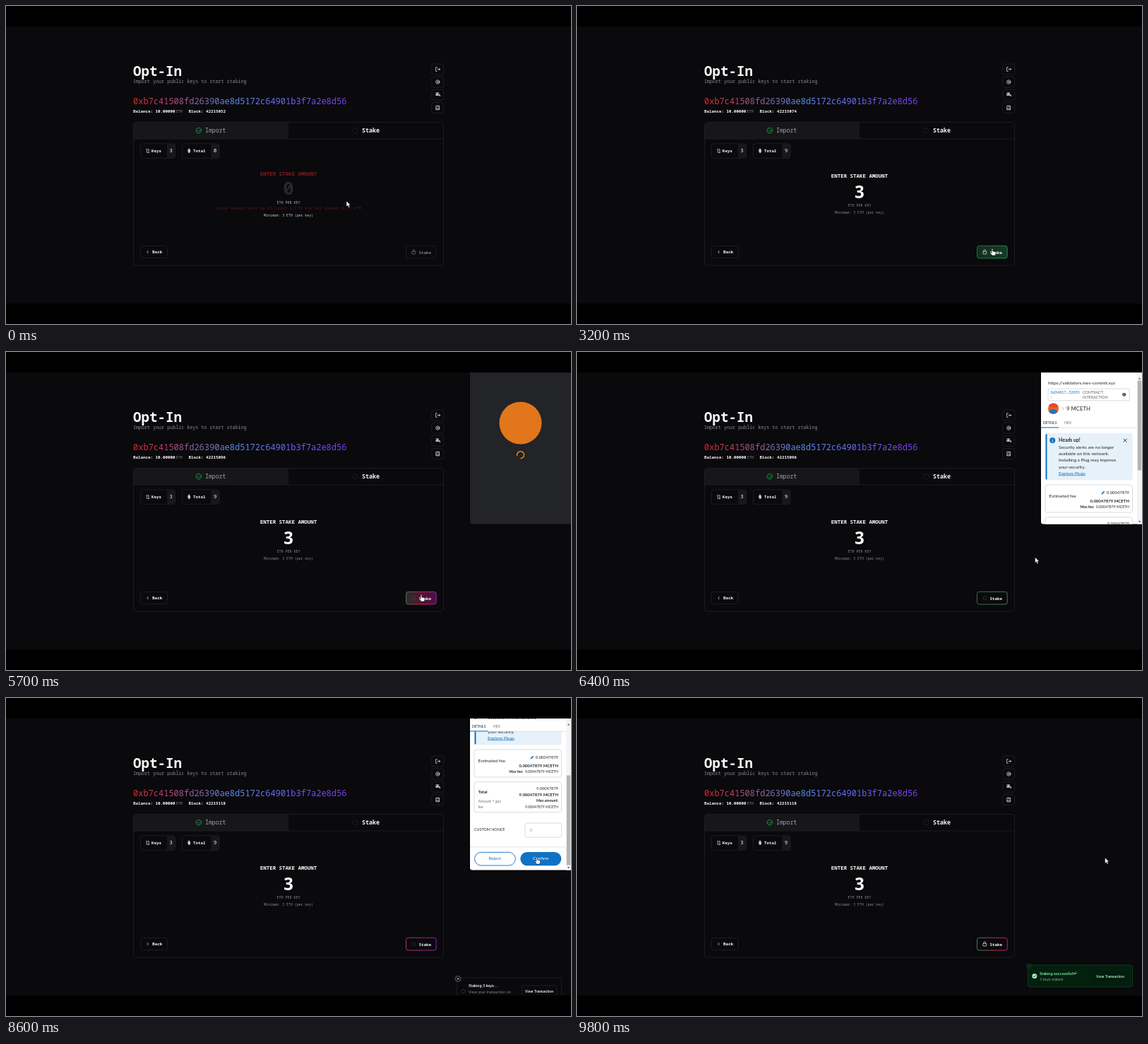
Animation, 800 px wide and 450 px high, one loop 9.9 s. Source, as an HTML page:

```html
<!DOCTYPE html>
<html lang="en">
<head>
<meta charset="utf-8">
<title>Opt-In</title>
<style>
  html, body { margin: 0; height: 100%; overflow: hidden; background: #000; }
  svg { display: block; width: 800px; height: 450px; }
  text { white-space: pre; }
  .mono { font-family: "Noto Sans Mono", "DejaVu Sans Mono", monospace; font-size: 5.83px; fill: #fafafa; }
  .wallet { font-family: Lato, sans-serif; font-size: 6.4px; fill: #24272a; }
  .toast { font-family: Inter, sans-serif; font-size: 5.1px; fill: #fafafa; }
  .b { font-weight: 700; }
  .m { font-weight: 600; }
  .mid { text-anchor: middle; }
  .end { text-anchor: end; }
  .grey { fill: #8b8b92; }
  .line { fill: none; stroke: #1d1d21; }
  .icon { fill: none; stroke: #d8d8dc; stroke-width: .8; stroke-linecap: round; stroke-linejoin: round; }
  .card { fill: #fff; stroke: #cfd2d6; stroke-width: .8; }
</style>
</head>
<body>
<svg viewBox="0 0 800 450">
  <defs>
    <linearGradient id="address" gradientUnits="userSpaceOnUse" x1="180" x2="482" y1="0" y2="0">
      <stop stop-color="#dc2626"/><stop offset=".47" stop-color="#5b8cf0"/><stop offset="1" stop-color="#7c3aed"/>
    </linearGradient>
    <linearGradient id="glow" gradientUnits="userSpaceOnUse" x1="566" x2="695" y1="0" y2="0">
      <stop stop-color="#1c6a3e"/><stop offset=".42" stop-color="#288a50"/>
      <stop offset=".66" stop-color="#c81e68"/><stop offset="1" stop-color="#6d28d9"/>
    </linearGradient>
    <clipPath id="popupClip"><rect x="657" y="10" width="146" height="233.5" rx="3"/></clipPath>
    <g id="lock" class="icon"><rect x="-2.5" y="-.6" width="5" height="3.6" rx=".7"/><path d="M-1.5-.6v-1a1.5 1.5 0 0 1 3 0v1"/></g>
    <circle id="spokes" r="2.5" fill="none" stroke="#505058" stroke-width=".9" stroke-dasharray="1 .96"/>
  </defs>

  <rect y="29" width="800" height="392" fill="#0a090c"/>

  <g class="mono">
    <text class="b" x="180" y="98.5" font-size="19.2" style="font-size:19.2px">Opt-In</text>
    <text class="grey" x="180" y="108.5" style="font-size:6.7px">Import your public keys to start staking</text>
    <text x="180" y="139" style="font-size:12px;fill:url(#address)">0xb7c41508fd26390ae8d5172c64901b3f7a2e8d56</text>
    <text class="m" x="180" y="150.7">Balance: 10.00000</text>
    <text class="grey" x="241" y="150.7" style="font-size:5px">ETH</text>
    <text class="m" x="258.5" y="150.7">Block: <tspan id="block"></tspan></text>

    <g id="tools"></g>
    <g class="icon">
      <path d="M610.4 86.7h-1.8v5.6h1.8M611 89.5h3.6m-1.4-1.5 1.5 1.5-1.5 1.5"/>
      <circle cx="611.3" cy="107.5" r="2.7"/><circle cx="611.3" cy="107.5" r="1"/>
      <path d="M608.6 125.3h4.2q1.6 0 1.6 2.2m-3.6-2.4v-1.8m-1.8-.1h3.6m-3.6 3h3" stroke-width="1.2"/>
      <path d="M609.2 141.2h4.4v5.6h-4.4zM609.2 145.2h4.4M610.7 142.7h1.6"/>
    </g>

    <rect class="line" x="180.5" y="164.5" width="439" height="202.7" rx="4"/>
    <path d="M181 188v-20q0-3 3-3h216v23z" fill="#17171a"/>
    <path class="line" d="M181 188h438.500"/>
    <g class="icon" style="stroke:#22b455"><path d="M276.500 175.300a3.700 3.700 0 1 1-1.800-2.400M271.500 176l1.500 1.500 3.700-3.900"/></g>
    <text x="282" y="179" style="font-size:8.2px;fill:#a1a1aa">Import</text>
    <circle class="line" cx="494.500" cy="176.300" r="3.500"/>
    <text class="m" x="504" y="179" style="font-size:8.3px">Stake</text>

    <path d="M228 195.500h9q2.500 0 2.500 2.500v14.500q0 2.500-2.500 2.500h-9zM290.500 195.500h9q2.500 0 2.500 2.500v14.500q0 2.500-2.500 2.500h-9z" fill="#18181b"/>
    <rect class="line" x="190.500" y="194.800" width="49" height="20.500" rx="3"/>
    <rect class="line" x="249.500" y="194.800" width="52.500" height="20.500" rx="3"/>
    <g class="icon" stroke-width=".6"><path d="M199.300 203v4.500m0-4.500-.5-.7m3.200.7v4.500m0-4.500-1-.7m-.1 5.200h1.800"/><path d="M259.300 202l1.700 2.900-1.700 1-1.700-1zM257.800 206l1.500 2 1.500-2" fill="#d8d8dc"/></g>
    <text class="m" x="206" y="206.800">Keys</text>
    <text class="mid" x="233.700" y="207.300" style="font-size:7px">3</text>
    <text class="m" x="265" y="206.800">Total</text>
    <text class="mid" id="total" x="296.200" y="207.300" style="font-size:7px"></text>

    <g id="empty" class="mid">
      <text class="m" x="400" y="239.500" style="font-size:7.46px;fill:#7f1d1d">ENTER STAKE AMOUNT</text>
      <text class="b" x="400" y="267.300" style="font-size:25.500px;fill:#29292d">0</text>
      <text x="400" y="280" style="font-size:5px;fill:#b4b4ba">ETH PER KEY</text>
      <text x="400" y="287.800" style="fill:#651518">Stake amount must be at least 3 ETH and not exceed 3.32 ETH</text>
      <text x="400" y="298.300" style="font-size:4.860px;fill:#c8c8cc">Minimum: 3 ETH (per key)</text>
    </g>
    <g id="filled" class="mid">
      <text class="m" x="400" y="243.300" style="font-size:7.46px">ENTER STAKE AMOUNT</text>
      <text class="b" x="400" y="272" style="font-size:25.500px">3</text>
      <text class="grey" x="400" y="284.200" style="font-size:5px">ETH PER KEY</text>
      <text class="grey" x="400" y="294.200" style="font-size:4.860px">Minimum: 3 ETH (per key)</text>
    </g>

    <rect class="line" x="190.500" y="339.500" width="38" height="17" rx="3"/>
    <path class="icon" d="M201.300 346.500l-1.500 1.600 1.500 1.600"/>
    <text class="m" x="207" y="350" style="font-size:6px">Back</text>

    <rect id="hover" x="566.500" y="339.300" width="42.700" height="17.700" rx="3" fill="url(#glow)" opacity=".4"/>
    <rect id="edge" class="line" x="566.500" y="339.300" width="42.700" height="17.700" rx="3"/>
    <g id="stake">
      <use id="stakeLock" href="#lock" x="577.300" y="348"/>
      <g transform="translate(577.300 348.200)"><use id="stakeSpin" href="#spokes"/></g>
      <text class="m" x="584.500" y="350.500">Stake</text>
    </g>
  </g>

  <g class="toast" id="toast">
    <g id="pending">
      <rect class="line" x="638.500" y="375.700" width="148" height="37.800" rx="3" style="fill:#0a090c"/>
      <g transform="translate(647.500 394.800)"><use id="toastSpin" href="#spokes"/></g>
      <text class="m" x="655" y="389">Staking 3 keys...</text>
      <text class="grey" x="655" y="397.500">View your transaction on</text>
      <text class="grey" x="655" y="405">explorer</text>
      <rect class="line" x="730.500" y="387" width="49" height="15.500" rx="2.500"/>
      <text class="m mid" x="755" y="396.700" style="font-size:4.800px">View Transaction</text>
      <circle cx="640" cy="377.300" r="3.900" fill="#0a090c" stroke="#85858b" stroke-width=".7"/>
      <path class="icon" d="M638.800 376.100l2.400 2.400m0-2.400-2.400 2.400" stroke-width=".5"/>
    </g>
    <g id="success">
      <rect x="638.500" y="378" width="148" height="30.800" rx="3" fill="#03200e" stroke="#0b3a1b"/>
      <circle cx="647.800" cy="393.600" r="3.500" fill="#a5e8bb"/>
      <path d="M646.200 393.700l1.200 1.200 2.200-2.500" fill="none" stroke="#03200e" stroke-width=".8"/>
      <text class="m" x="655" y="391.500" style="fill:#86efac">Staking successful!</text>
      <path d="M703.500 391.500l1.300-3.300 2 2z" fill="#c9c58a"/><path d="M706 388l1.500-1m-.5 2.500h1.400" stroke="#86efac" stroke-width=".6"/>
      <text x="655" y="400" style="fill:#93a99a">3 keys staked</text>
      <rect x="730.500" y="386.500" width="49" height="14.500" rx="2.500" fill="#031c0d"/>
      <text class="m mid" x="755" y="395.600" style="font-size:4.800px;fill:#b5efc8">View Transaction</text>
      <circle cx="640" cy="379.300" r="3.300" fill="#03200e" stroke="#0f4a22" stroke-width=".7"/>
      <path d="M639 378.300l2 2m0-2-2 2" stroke="#3f7a53" stroke-width=".5"/>
    </g>
  </g>

  <g id="popup">
    <rect x="655.500" y="10" width="149" height="235.500" rx="4" fill="#000" opacity=".3"/>
    <g clip-path="url(#popupClip)">
      <g id="loader">
        <rect x="657" y="10" width="146" height="234" fill="#222427"/>
        <circle cx="728.500" cy="100.500" r="30" fill="#e2761b"/>
        <path id="loaderArc" d="M728.500 140.600a5 5 0 1 1-4.700 3.300" fill="none" stroke="#f6851b" stroke-width="1.400"/>
      </g>
      <rect id="sheet" x="657" y="10" width="146" height="234" fill="#fff"/>
      <g id="request" class="wallet">
        <g id="page">
          <text x="667" y="46">https://validators.mev-commit.xyz</text>
          <rect class="card" x="667" y="52" width="115.500" height="16.800" rx="2.500"/>
          <text x="670.500" y="59" style="font-size:5.300px;fill:#0376c9">0xD4817...52093</text>
          <text x="671" y="66" style="font-size:5.300px;fill:#0376c9">:</text>
          <g style="font-size:5.400px;fill:#5c6167"><text x="716" y="58.800" fill="inherit">CONTRACT</text><text x="716" y="65.800">INTERACTION</text></g>
          <circle cx="774.700" cy="60.300" r="2.500" fill="#4a4e53"/><path d="M774.700 59.900v1.700m0-3v.6" stroke="#fff" stroke-width=".7"/>
          <circle cx="674.500" cy="80.200" r="7.600" fill="#f2602a"/>
          <path d="M667.800 76.600a7.600 7.600 0 0 1 13.900 1.200q-6 2.600-13.900-1.200z" fill="#e84a1f"/><path d="M668 84.200q5-6.500 12.700-.3a7.600 7.600 0 0 1-12.700.3z" fill="#2271b9"/>
          <path d="M687 79.300l.8-.7.800.7.800-.7M687 81h2.400" stroke="#777" fill="none" stroke-width=".5"/>
          <text x="693" y="82.700" style="font-size:7.800px">9 MCETH</text>

          <rect x="663" y="115" width="123.500" height="66.500" rx="2" fill="#e6f1f9"/>
          <rect x="663.500" y="116" width="2" height="64.500" rx="1" fill="#1072c4"/>
          <circle cx="673.200" cy="125" r="4" fill="#1072c4"/><path d="M673.200 124.600v2.600m0-4.600v.9" stroke="#fff" stroke-width=".9"/>
          <path d="M773.700 122.600l5 5m0-5-5 5" stroke="#24272a" stroke-width=".9"/>
          <text class="b" x="682" y="127.200" style="font-size:6.900px">Heads up!</text>
          <text x="682" y="136.500">Security alerts are no longer</text>
          <text x="682" y="146">available on this network.</text>
          <text x="682" y="155.300">Installing a Plug may improve</text>
          <text x="682" y="164.500">your security.</text>
          <text x="682" y="173.500" text-decoration="underline" style="fill:#1072c4">Explore Plugs</text>

          <rect class="card" x="663" y="188" width="123.500" height="39" rx="3"/>
          <text x="668.500" y="206">Estimated fee</text>
          <path d="M742.500 201.500l.5-1.700 3-3 1.200 1.200-3 3z" fill="#1072c4"/>
          <text class="end" x="782" y="201.200" style="font-size:5.900px">0.00047879</text>
          <text class="end b" x="782" y="212.700" style="font-size:6px">0.00047879 MCETH</text>
          <text class="end" x="782" y="221.200" style="font-size:5.100px"><tspan class="b">Max fee:</tspan>  0.00047879 MCETH</text>

          <rect class="card" x="663" y="233.700" width="123.500" height="43" rx="3"/>
          <text class="end" x="782" y="244.500" style="font-size:5.700px">9.00047879</text>
          <text class="b" x="668.500" y="249.500" style="font-size:6px">Total</text>
          <text class="end b" x="782" y="253.800" style="font-size:6px">9.00047879 MCETH</text>
          <text x="668.500" y="262.500" style="font-size:5.300px;fill:#6a6f75">Amount + gas</text>
          <text x="668.500" y="270.700" style="font-size:5.300px;fill:#6a6f75">fee</text>
          <text class="end b" x="782" y="262.300" style="font-size:5.300px">Max amount:</text>
          <text class="end" x="782" y="270.700" style="font-size:5.100px">9.00047879 MCETH</text>

          <text x="663" y="303" style="font-size:5.400px">CUSTOM NONCE</text>
          <rect class="card" x="735" y="292" width="51.500" height="20" rx="2.500"/>
          <text x="741.500" y="304.200" style="fill:#a0a4a8">0</text>
          <path d="M657 325.800h136" stroke="#d6d9dc" stroke-width=".7"/>
          <rect x="663.500" y="333.300" width="57.800" height="18.700" rx="9.300" fill="#fff" stroke="#1072c4" stroke-width=".9"/>
          <rect x="728.300" y="333" width="58" height="19.200" rx="9.600" fill="#1072c4"/>
          <text class="mid" x="692.300" y="344.200" style="fill:#1072c4">Reject</text>
          <text class="mid" x="757.300" y="344.200" style="fill:#fff">Confirm</text>
        </g>
        <g id="tabs">
          <rect x="657" y="90" width="136" height="17" fill="#fff"/>
          <path d="M657 107.200h136" stroke="#d6d9dc" stroke-width=".7"/><path d="M657 106.900h25.500" stroke="#1072c4"/>
          <text x="660" y="102.200" style="font-size:5px">DETAILS</text>
          <text x="690" y="102.200" style="font-size:5px;fill:#6a6f75">HEX</text>
        </g>
        <rect x="793" y="29" width="10" height="215" fill="#f4f4f4"/>
        <path d="M794.800 38.500h3.600l-1.800-2.200zM794.800 239h3.600l-1.800 2.200z" fill="#606060"/>
        <rect id="thumb" x="793.800" y="40.500" width="5.400" height="127" fill="#b4b4b4"/>
      </g>
    </g>
  </g>

  <g id="cursor">
    <path id="arrow" d="M0 0v8l1.900-1.700 1.300 2.900 1.500-.7-1.300-2.800h2.600z" fill="#fff" stroke="#000" stroke-width=".5"/>
    <path id="hand" d="M-.8 0q.8-1.300 1.600 0v3l3.300.8q1 .3.900 1.300l-.6 3.900h-4.600l-2.600-3.800q.2-1.200 2 .2z" fill="#fff" stroke="#000" stroke-width=".5"/>
  </g>

  <path d="M0 0h800v29H0zM0 421h800v29H0z"/>
</svg>

<script>
const LOOP = 9900, SCROLL = 115;
const $ = id => document.getElementById(id);
const set = (id, name, value) => $(id).setAttribute(name, value);
const show = (id, on) => $(id).style.display = on ? '' : 'none';
const ramp = (t, from, to) => Math.min(1, Math.max(0, (t - from) / (to - from)));
const smooth = x => x * x * (3 - 2 * x);
const easeOut = x => 1 - (1 - x) ** 3;

// Cursor stops: time, x, y
const path = [[0, 482, 276], [2100, 482, 276], [2900, 588, 344], [5950, 588, 344],
  [6350, 648.5, 290.5], [6450, 648.5, 290.5], [6900, 740, 200], [7400, 751.5, 226], [9300, 751.5, 226], [9700, 747.5, 226]];
function cursorAt(t) {
  let i = path.findIndex(stop => stop[0] > t);
  if (i < 0) return path[path.length - 1].slice(1);
  const [a, b] = [path[i - 1], path[i]], k = smooth(ramp(t, a[0], b[0]));
  return [a[1] + (b[1] - a[1]) * k, a[2] + (b[2] - a[2]) * k];
}

$('tools').innerHTML = [89.5, 107.6, 125.8, 144].map(y =>
  `<rect class="line" x="602.8" y="${y - 7.5}" width="17" height="15" rx="3"/>`).join('');

function drawPage(t) {
  const typed = t >= 600, waiting = t >= 4100 && t < 8900;
  show('empty', !typed);
  show('filled', typed);
  $('total').textContent = typed ? 9 : 0;

  const blockTimes = [1100, 4200, 7300].filter(start => start <= t);
  const age = t - (blockTimes.at(-1) ?? -LOOP), fade = ramp(age, 600, 800);
  $('block').textContent = 42215052 + 22 * blockTimes.length;
  $('block').style.fill = `rgb(250,${130 + 120 * fade},${60 + 190 * fade})`;

  const sweep = (1 + Math.cos((t - 5000) / 4000 * 2 * Math.PI)) / 2;
  set('glow', 'gradientTransform', `translate(${-86 * sweep})`);
  $('edge').style.stroke = typed ? 'url(#glow)' : '';
  set('stake', 'opacity', typed ? 1 : .5);
  show('stakeLock', !waiting);
  show('stakeSpin', waiting);
  set('stakeSpin', 'transform', `rotate(${t * .36})`);
}

function drawPopup(t) {
  const open = ramp(t, 4910, 5080), close = ramp(t, 8920, 9065);
  const scale = 1 - .15 * (1 - open) - .09 * close;
  show('popup', open > 0 && close < 1);
  set('popup', 'opacity', open * (1 - close));
  set('popup', 'transform', `translate(${728 - 26 * (1 - scale)} 125) scale(${scale}) translate(-728 -125)`);
  show('loader', t < 5800);
  show('sheet', t >= 5800);
  show('request', t >= 5800 && t < 8850);
  set('loaderArc', 'transform', `rotate(${(t - 5000) * .36} 728.5 145.6)`);

  const scroll = SCROLL * smooth(ramp(t, 6900, 7350));
  set('page', 'transform', `translate(0 ${-scroll})`);
  set('tabs', 'transform', `translate(0 ${-Math.min(60, scroll)})`);
  set('thumb', 'y', 40.5 + 69 * scroll / SCROLL);
}

function drawToast(t) {
  const done = ramp(t, 9450, 9700);
  show('toast', t > 8500);
  set('toast', 'transform', `translate(0 ${48 * (1 - easeOut(ramp(t, 8500, 8900)))})`);
  set('pending', 'opacity', 1 - done);
  set('success', 'opacity', done);
  set('toastSpin', 'transform', `rotate(${t * .36})`);
}

function drawCursor(t) {
  const [x, y] = cursorAt(t);
  const overStake = x > 566 && x < 609 && y > 339 && y < 357;
  const overConfirm = x > 728 && y > 218 && t > 7000 && t < 8850;
  set('cursor', 'transform', `translate(${x} ${y})`);
  show('hand', overStake || overConfirm);
  show('arrow', !overStake && !overConfirm);
  show('hover', overStake);
}

function frame() {
  const t = performance.now() % LOOP;
  drawPage(t);
  drawPopup(t);
  drawToast(t);
  drawCursor(t);
  requestAnimationFrame(frame);
}
frame();
</script>
</body>
</html>
```
